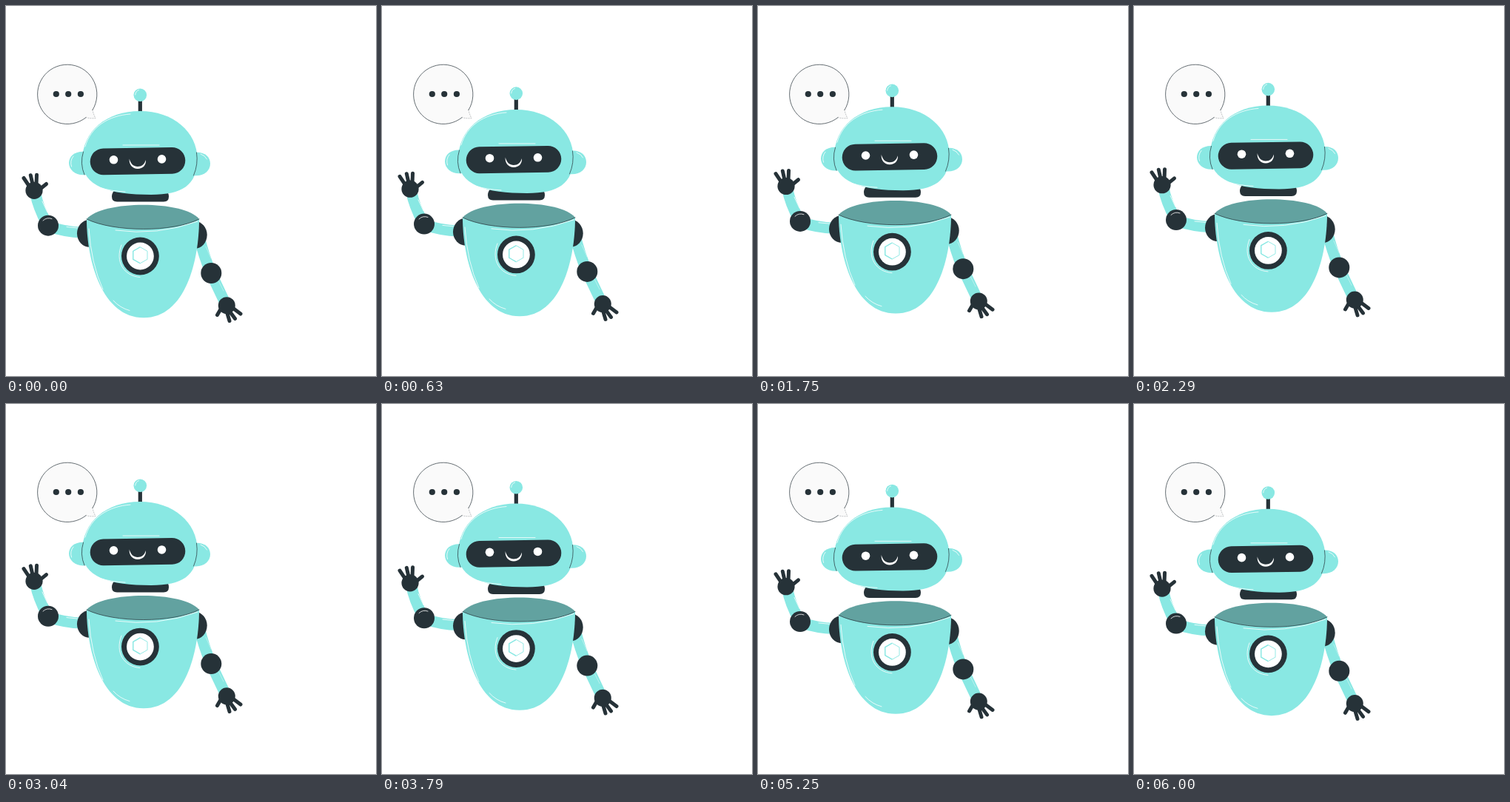
These frames come from a looping animation (500x500 px, 6040 ms). An HTML page:

```html
<!DOCTYPE html>
<html lang="en">
<head>
<meta charset="utf-8">
<title>Waving robot</title>
<style>
html, body { margin: 0; width: 100%; height: 100%; overflow: hidden; background: #fff; }
svg { display: block; width: 100vw; height: 100vh; }
.teal { fill: #89e8e3; }
.dark { fill: #263238; }
.white { fill: #fff; }
.limb, .finger, .shine, .seam { fill: none; stroke-linecap: round; stroke-linejoin: round; }
.limb { stroke: #89e8e3; stroke-width: 15; stroke-linecap: butt; }
.finger { stroke: #263238; stroke-width: 5; }
.shine { stroke: #fff; stroke-width: .8; }
.seam { stroke: #263238; stroke-width: .7; }
</style>
</head>
<body>
<svg viewBox="0 0 500 500">
  <!-- speech bubble -->
  <path d="M117 140.5A40.2 40.2 0 1 0 108 150.7Q115 152.5 121 151.5Q118 146 117 140.5Z" fill="#fafafa"/>
  <path class="seam" d="M117 140.5A40.2 40.2 0 1 0 108 150.7"/>
  <path class="seam" d="M108 150.7Q115 152.5 121 151.5Q118 146 117 140.5" stroke-dasharray="1 2" opacity=".45"/>
  <g class="dark">
    <circle cx="67.8" cy="119" r="4.1"/>
    <circle cx="84.2" cy="119" r="4.1"/>
    <circle cx="100.9" cy="119" r="4.1"/>
  </g>

  <g id="robot">
    <!-- raised arm -->
    <path class="limb" d="M103 306Q80 305.5 58 298" stroke-width="17"/>
    <path class="limb" d="M40 254Q43 271 56 296"/>
    <path class="shine" d="M49 264L56 279M82 298.5L97 300"/>
    <path class="finger" d="M31 243L24 232.5M36 241L33.3 228.8M41 241L41.5 228.3M44 249L54.5 240.5"/>
    <circle class="dark" cx="38" cy="249.3" r="11.6"/>
    <circle class="dark" cx="57" cy="296.7" r="14"/>
    <path class="shine" d="M50 290Q55 285 62 287.5"/>

    <!-- lowered arm -->
    <path class="limb" d="M261 312Q267 337 277 361L297 403"/>
    <path class="shine" d="M270 325L277 341M287 371L294 385" opacity=".5"/>
    <path class="finger" d="M291 408L285.5 417.5M298 412L302 425.5M301 411L309.5 422.5M305 407L317 416"/>
    <circle class="dark" cx="298.3" cy="404.7" r="11.5"/>
    <circle class="dark" cx="277.3" cy="361" r="14"/>

    <!-- torso -->
    <ellipse class="dark" cx="113" cy="307.3" rx="17" ry="18.5"/>
    <ellipse class="dark" cx="255" cy="309.3" rx="16.7" ry="18.5"/>
    <path class="teal" d="M109 288C109 345 130 421.3 186 421.3C242 421.3 261 345 261 288Z"/>
    <path d="M109 288C130 262.5 241 262.5 261 288C226 306 146 306 109 288Z" fill="#62a2a0"/>
    <path class="seam" d="M109 288C146 306 226 306 261 288"/>
    <path class="shine" d="M148 303Q204 311 259 291M112 301Q115 348 131 383M145 398Q154 408 167 411.5"/>
    <path class="shine" d="M156 323C147 345 159 365 181 366.5"/>
    <circle class="dark" cx="181.4" cy="338" r="25.4"/>
    <circle class="white" cx="181.4" cy="338" r="18.4"/>
    <path d="M181.3 325.8L191 331.3V342.3L181.3 347.8L171.7 342.3V331.3Z" fill="none" stroke="#89e8e3" stroke-width=".9"/>
    <path d="M181.3 325.8L171.7 331.3V342.3L181.3 347.8" fill="none" stroke="#89e8e3" stroke-width="1.3"/>

    <!-- neck and antenna -->
    <path class="dark" d="M146 250H217Q220 253 220 257.5Q220 264.5 213 264.5H150Q143 264.5 143 257.5Q143 253 146 250Z"/>
    <rect class="dark" x="178.7" y="126" width="5.2" height="18"/>
    <circle class="teal" cx="181.3" cy="120.2" r="8.8"/>
    <path class="shine" d="M174.7 120Q175 115 179.5 113.5"/>

    <!-- head -->
    <path class="teal" d="M108 197C95 195 85 202 85 212C85 222 95 230 108 228Z"/>
    <path class="teal" d="M254 198C267 196 276 203 276 213C276 223 267 231 252 229Z"/>
    <path class="shine" d="M91 203Q86 209 88.5 217M263 200Q269 202 271.5 207"/>
    <path class="teal" d="M103 209C103 169 136 142 181 142C226 142 258.500 170 258.500 207C258.500 242 238 255 196 255C140 255 103 244 103 209Z"/>
    <path class="seam" d="M104.500 197Q99.500 213 106 228M257.500 198Q260 214 253.500 229"/>
    <path class="shine" d="M107 190C114 164 138 148 168 146M108 233Q120 249 161 251"/>
    <path class="shine" d="M158 188H207"/>
    <rect class="dark" x="113.700" y="191.700" width="128.600" height="35.800" rx="17.900" transform="rotate(-.9 178 209.600)"/>
    <circle class="white" cx="145.500" cy="207.800" r="5.800"/>
    <circle class="white" cx="210.500" cy="206.900" r="5.800"/>
    <path class="white" d="M166.700 206.500C166 214.500 171 220 178 220C185 220 189.500 215 189 208C187 214 183.500 217 178 217C172.500 217 168.500 213.500 166.700 206.500Z"/>
  </g>
</svg>
<script>
const LOOP = 6040, LIFT = 10;
const robot = document.getElementById('robot');

function draw(now) {
  const phase = (now % LOOP) / LOOP;
  const rise = LIFT * (1 - Math.abs(1 - 2 * phase));
  robot.setAttribute('transform', `translate(0 ${-rise})`);
  requestAnimationFrame(draw);
}
draw(performance.now());
</script>
</body>
</html>
```
